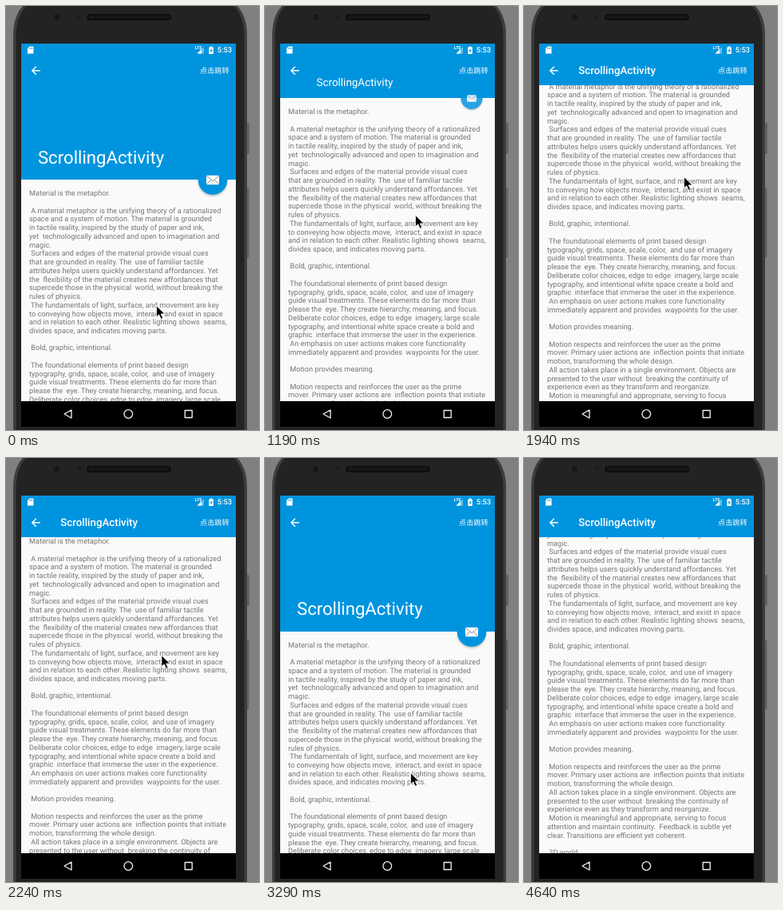
Recreate the animation shown at these times as an HTML page. Size 317 px wide and 530 px high, loop 5550 ms.

```html
<!DOCTYPE html>
<html lang="zh">
<head>
<meta charset="utf-8">
<title>Scrolling screen</title>
<style>
html, body { margin: 0; width: 100%; height: 100%; overflow: hidden; background: #808080; }
svg { display: block; width: 317px; height: 530px; }
text { font-family: Roboto, "Noto Sans CJK SC", sans-serif; white-space: pre; text-rendering: geometricPrecision; }
#copy { font-size: 9.18px; fill: #757575; }
.cjk { font-family: "Noto Sans CJK SC", "Noto Sans CJK", sans-serif; }
</style>
</head>
<body>
<svg viewBox="0 0 317 530">
  <defs>
    <clipPath id="screen"><path d="M19 47H288V494H19Z"/></clipPath>
    <filter id="soft" x="-30%" y="-30%" width="160%" height="160%"><feGaussianBlur stdDeviation="1.6"/></filter>
  </defs>

  <!-- phone -->
  <path fill="#808080" d="M0 0H317V530H0Z"/>
  <path fill="#626262" d="M301 146h2.500q1.500 0 1.500 2v35q0 2-1.500 2H301ZM301 227h2q1.500 0 1.500 2v84q0 2-1.500 2H301Z"/>
  <path fill="#3d3d3d" d="M21 0Q9 13 9 37V530H302V37Q302 13 290 0Z"/>
  <path fill="#232323" d="M25 0Q12.500 14 12.500 38V530H298.500V38Q298.500 14 286 0Z"/>
  <rect x="101" y="10" width="106" height="8" rx="4" fill="#0e0e0e"/>
  <path d="M105 14H204" stroke="#262626" stroke-width="4" stroke-dasharray="1 1.500"/>
  <circle cx="63.500" cy="14" r="3.500" fill="#14171b"/>
  <circle cx="91.500" cy="13.500" r="2.500" fill="#1b1b1b"/>

  <!-- app -->
  <g clip-path="url(#screen)">
    <path fill="#fafafa" d="M19 47H288V494H19Z"/>
    <g id="copy"></g>
    <rect id="bar" x="19" y="47" width="269" fill="#0094de"/>
    <text id="title" fill="#fff">ScrollingActivity</text>
    <g id="fab">
      <circle cy="1.800" r="18" fill="#000" opacity=".28" filter="url(#soft)"/>
      <circle r="18.300" fill="#0094de"/>
      <rect x="-8" y="-5.800" width="16" height="11.500" rx="1" fill="#fafafa"/>
      <path d="M-7.500-5L0 1.300L7.500-5M-7.500 5.200L-2.500-.1M7.500 5.200L2.500-.1" fill="none" stroke="#8c9499" stroke-width="1"/>
    </g>
  </g>

  <!-- status bar and toolbar -->
  <path fill="#fff" d="M29.500 50.500H34.500V59.500H27V53Z"/>
  <path stroke="#0094de" stroke-width=".8" d="M29.700 51.800v2M31.300 51.800v2M32.900 51.800v2"/>
  <text x="236.800" y="54.200" font-size="5.400" font-weight="700" fill="#fff">LTE</text>
  <path fill="#fff" opacity=".4" d="M248 51V59.500H239.500Z"/>
  <path fill="#fff" d="M245 54V59.500H239.500Z"/>
  <path fill="#fff" d="M254.300 51.500h1.500v-1h2.500v1h1.500v8.500h-5.500Z"/>
  <path fill="#0094de" d="M257.600 52.800l-2.100 3.500h1.200v2.400l2.100-3.500h-1.200Z"/>
  <text x="264.700" y="58.300" font-size="9.300" font-weight="500" fill="#fff">5:53</text>
  <path d="M42.800 80.800H33M37.800 75.800L32.800 80.800L37.800 85.800" fill="none" stroke="#fff" stroke-width="1.400"/>
  <text class="cjk" x="243" y="84" font-size="9.200" font-weight="500" fill="#fff">点击跳转</text>

  <!-- navigation -->
  <path d="M19 494H288V526H19Z"/>
  <g fill="none" stroke="#f2f2f2" stroke-width="1.300" stroke-linejoin="round">
    <path d="M82 505V515L73 510Z"/>
    <circle cx="153.300" cy="510" r="5.300"/>
    <path d="M224.200 505.500h9v9h-9Z"/>
  </g>

  <path id="cursor" d="M.5 .7V14.700L3.700 11.800L6.300 17.300L8.700 16.200L6.200 10.900H11Z" stroke="#fff" stroke-width=".8"/>
</svg>

<script>
const copy = `Material is the metaphor.

 A material metaphor is the unifying theory of a rationalized
space and a system of motion. The material is grounded
in tactile reality, inspired by the study of paper and ink,
yet  technologically advanced and open to imagination and
magic.
 Surfaces and edges of the material provide visual cues
that are grounded in reality. The  use of familiar tactile
attributes helps users quickly understand affordances. Yet
the  flexibility of the material creates new affordances that
supercede those in the physical  world, without breaking the
rules of physics.
 The fundamentals of light, surface, and movement are key
to conveying how objects move,  interact, and exist in space
and in relation to each other. Realistic lighting shows  seams,
divides space, and indicates moving parts.

 Bold, graphic, intentional.

 The foundational elements of print based design
typography, grids, space, scale, color,  and use of imagery
guide visual treatments. These elements do far more than
please the  eye. They create hierarchy, meaning, and focus.
Deliberate color choices, edge to edge  imagery, large scale
typography, and intentional white space create a bold and
graphic  interface that immerse the user in the experience.
 An emphasis on user actions makes core functionality
immediately apparent and provides  waypoints for the user.

 Motion provides meaning.

 Motion respects and reinforces the user as the prime
mover. Primary user actions are  inflection points that initiate
motion, transforming the whole design.
 All action takes place in a single environment. Objects are
presented to the user without  breaking the continuity of
experience even as they transform and reorganize.
 Motion is meaningful and appropriate, serving to focus
attention and maintain continuity.  Feedback is subtle yet
clear. Transitions are efficient yet coherent.

 3D world`;

const LOOP = 5550, RANGE = 118, LINE = 10.73;
const el = id => document.getElementById(id);
const set = (node, attrs) => { for (const k in attrs) node.setAttribute(k, attrs[k]); };
const [body, bar, title, fab, cursor] = ["copy", "bar", "title", "fab", "cursor"].map(el);

copy.split("\n").forEach((line, i) => {
  const t = document.createElementNS("http://www.w3.org/2000/svg", "text");
  t.textContent = line;
  set(t, { x: 29, y: 237.3 + i * LINE });
  body.append(t);
});

// Tracks of [step, value]
const scroll = [[0, 0], [1, 3], [2, 15], [6, 102], [7, 121], [8, 135], [9, 146], [11, 155],
  [12, 150], [13, 130], [15, 60], [16, 29.6], [17, 11], [18, 3], [20, .5], [21, 10], [22, 45],
  [23, 105], [24, 158], [25, 178], [26, 188], [27, 192]];
const pointX = [[0, 188], [6, 188], [11, 200], [16, 186], [20, 182], [24, 208]];
const pointY = [[0, 374], [1, 367], [2, 350], [6, 261], [8, 231], [11, 213], [13, 246], [16, 347],
  [18, 384], [19, 393], [20, 393], [21, 375], [22, 335], [24, 222], [25, 213], [27, 209]];
const fabSize = [[5, 1], [6, .74], [7, 0], [14, 0], [15, .7], [16, 1], [22, 1], [23, .5], [24, 0]];

const lerp = (a, b, f) => a + (b - a) * f;
function sample(track, k) {
  const i = track.findIndex(p => p[0] >= k);
  if (i < 0) return track[track.length - 1][1];
  if (i === 0) return track[0][1];
  const [a, b] = [track[i - 1], track[i]];
  return lerp(a[1], b[1], (k - a[0]) / (b[0] - a[0]));
}

// The screen refreshes about every 150 ms
const stepAt = t => t < 1040
  ? Math.min(4, Math.max(0, Math.floor(t / 150) - 2))
  : 5 + Math.floor((t - 1040) / 150);

function draw(t) {
  const k = stepAt(t), s = sample(scroll, k);
  const f = Math.min(1, s / RANGE), ease = 1 - (1 - f) ** 2;
  const edge = Math.round(217 - f * RANGE), size = sample(fabSize, k);
  set(body, { transform: `translate(0 ${-s})` });
  set(bar, { height: edge - 47 });
  set(title, {
    x: lerp(39.9, 68.3, f), y: lerp(196.6, 85, f),
    "font-size": lerp(22.2, 13.3, ease), "font-weight": f < 1 ? 400 : 500
  });
  set(fab, {
    transform: `translate(259 ${edge + .5}) scale(${size})`,
    opacity: lerp(.4, 1, size), visibility: size ? "visible" : "hidden"
  });
  set(cursor, {
    transform: `translate(${sample(pointX, k)} ${sample(pointY, k)})`,
    visibility: t < 4640 ? "visible" : "hidden"
  });
}

const start = performance.now();
function tick() {
  draw((performance.now() - start) % LOOP);
  requestAnimationFrame(tick);
}
tick();
</script>
</body>
</html>
```
